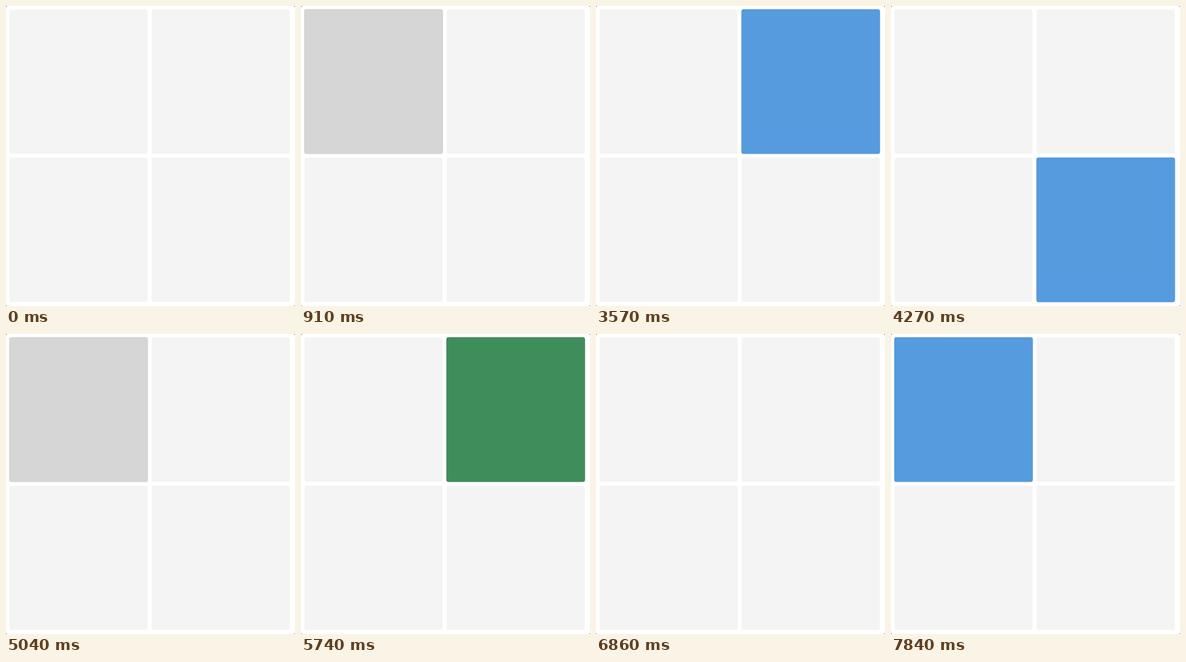
Animation, 494 px wide and 512 px high, one loop 8000 ms. Source, as an HTML page with a canvas:

```html
<!DOCTYPE html>
<html lang="en">
<head>
<meta charset="utf-8">
<title>Tile memory game</title>
<style>
  html, body { margin: 0; width: 100%; height: 100%; overflow: hidden; background: #fff; }
  canvas { display: block; }
</style>
</head>
<body>
<canvas id="board" width="494" height="512"></canvas>
<script>
const ctx = document.getElementById('board').getContext('2d');
const W = 494, H = 512, LOOP = 8000;

const IDLE = '#f4f4f4';
const SHOW = { fill: '#569bde', edge: '#5095d8' };
const HOVER = { fill: '#d6d6d6', edge: '#cbcbcb' };
const HIT = { fill: '#408d5c', edge: '#367c4f' };

// Tiles: 0 top left, 1 top right, 2 bottom left, 3 bottom right
const steps = [
  { tile: 2, from: 210, to: 910, look: SHOW },
  { tile: 0, from: 910, to: 1330, look: HOVER },
  { tile: 2, from: 1330, to: 1820, look: HOVER },
  { tile: 2, from: 1820, to: 2590, look: HIT },
  { tile: 1, from: 3570, to: 4270, look: SHOW },
  { tile: 3, from: 4270, to: 5040, look: SHOW },
  { tile: 0, from: 5040, to: 5460, look: HOVER },
  { tile: 1, from: 5460, to: 5740, look: HOVER },
  { tile: 1, from: 5740, to: 6860, look: HIT },
  { tile: 3, from: 5880, to: 6090, look: HOVER },
  { tile: 3, from: 6090, to: 6860, look: HIT },
  { tile: 0, from: 7840, to: 8000, look: SHOW }
];

function box(x, y, w, h, r, color) {
  ctx.fillStyle = color;
  ctx.beginPath();
  ctx.roundRect(x, y, w, h, r);
  ctx.fill();
}

function drawTile(i, look) {
  const x = 6 + (i % 2) * 243;
  const y = 6 + Math.floor(i / 2) * 253;
  if (!look) {
    box(x, y, 236, 246, 3, IDLE);
    return;
  }
  box(x - 0.5, y - 0.5, 237, 247, 4, look.edge);
  box(x + 0.5, y + 0.5, 235, 245, 3, look.fill);
}

function draw(t) {
  ctx.fillStyle = '#333';
  ctx.fillRect(0, 0, W, H);
  box(0, 0, W, H, 2.5, '#fff');
  for (let i = 0; i < 4; i++) {
    const step = steps.find(s => s.tile === i && t >= s.from && t < s.to);
    drawTile(i, step && step.look);
  }
}

const start = performance.now();
function tick() {
  draw((performance.now() - start) % LOOP);
  requestAnimationFrame(tick);
}
tick();
</script>
</body>
</html>
```
